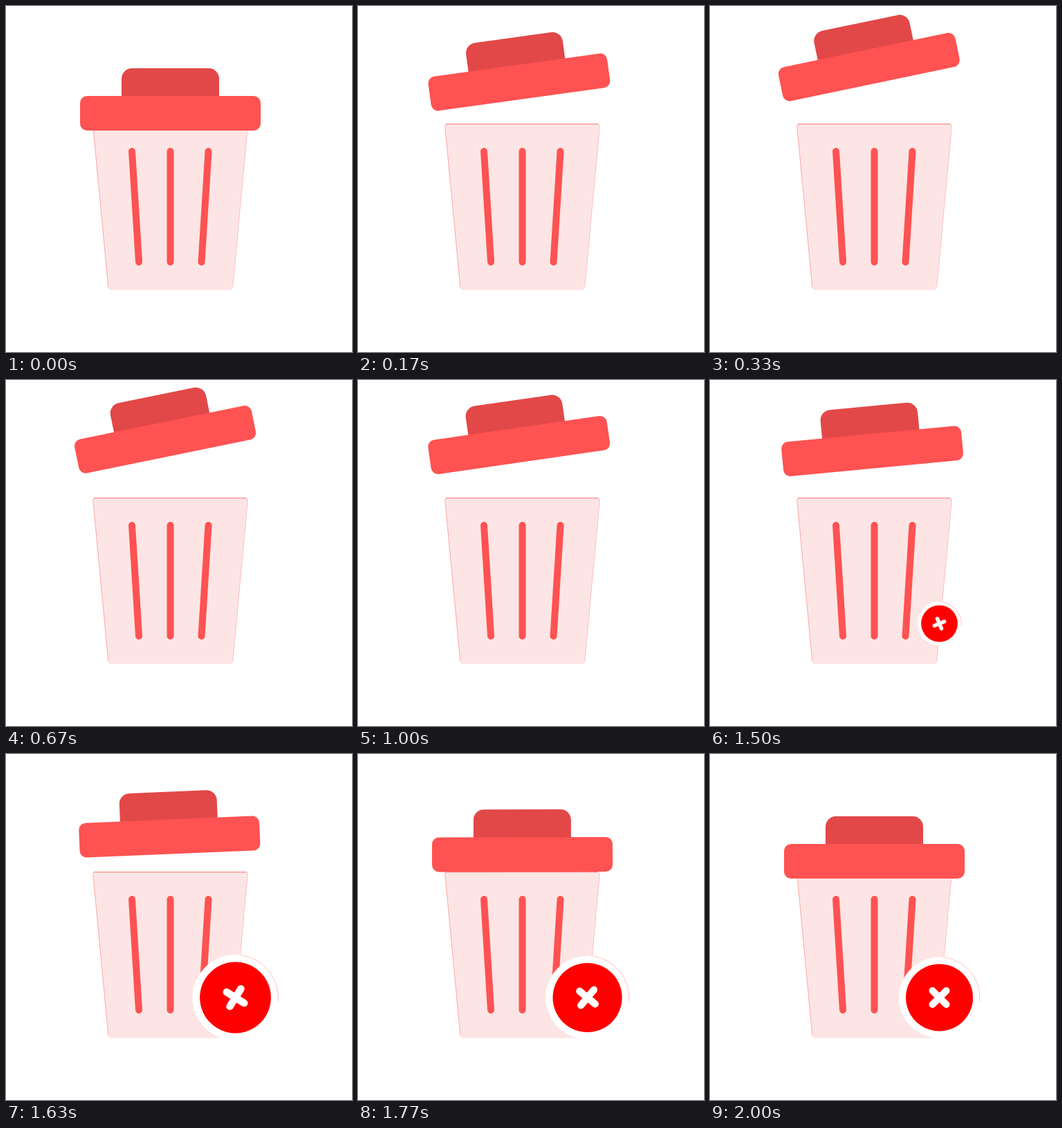
These frames come from a looping animation (500 px wide and 500 px high, 3030 ms). An HTML page:

```html
<!DOCTYPE html>
<html lang="en">
<head>
<meta charset="utf-8">
<title>Delete bin</title>
<style>
  html, body { margin: 0; width: 100%; height: 100%; overflow: hidden; background: #fff; }
  svg { display: block; width: 100%; height: 100%; }
</style>
</head>
<body>
<svg viewBox="0 0 500 500" fill="none" stroke-linecap="round" stroke-linejoin="round">
  <g id="can">
    <path fill="#fde5e5" d="M129 170H346Q350 170 349.6 174L328 406Q327.6 410.5 323 410.5H152Q148 410.5 147.5 406L125.5 174Q125 170 129 170Z"/>
    <path stroke="#ff5252" stroke-opacity=".75" d="M128 170.6H347"/>
    <path stroke="#ff5252" stroke-opacity=".5" stroke-width=".9" d="M128 170.6Q125.4 170.8 125.8 174L147.8 406"/>
    <path stroke="#ff5252" stroke-opacity=".35" stroke-width=".8" d="M347 170.6Q349.6 170.8 349.3 174L327.7 406"/>
    <path stroke="#ff5252" stroke-width="10" d="M182 210L192 370M237.5 210V370M292.5 210L282.5 370"/>
  </g>
  <g id="lid">
    <rect x="167" y="90" width="141" height="60" rx="15" fill="#e24848"/>
    <rect x="107" y="130" width="261" height="50" rx="10" fill="#ff5252"/>
  </g>
  <g id="badge">
    <circle r="58.5" fill="#fff"/>
    <path stroke="#ff5252" stroke-opacity=".45" stroke-width=".8" vector-effect="non-scaling-stroke" d="M8 -57.9A58.5 58.5 0 0 1 58.3 5"/>
    <circle r="48.5" fill="#f00"/>
    <path id="cross" stroke="#fff" stroke-width="10" d="M-10 -10L10 10M10 -10L-10 10"/>
  </g>
</svg>
<script>
  const LOOP = 3030;
  const [lid, badge, cross] = ["lid", "badge", "cross"].map(id => document.getElementById(id));

  const linear = p => p;
  const smooth = p => p * p * (3 - 2 * p);
  const soft = p => (p + smooth(p)) / 2;
  const easeIn = p => p ** 2.45;
  const easeOut = p => 1 - (1 - p) ** 2.4;

  // Each track: a start value, then segments of [from, to, value, easing] in ticks of 1/30 s.
  function track(start, segments, tick) {
    let value = start;
    for (const [from, to, target, ease = linear] of segments) {
      if (tick <= from) break;
      value += (target - value) * ease(Math.min(1, (tick - from) / (to - from)));
    }
    return value;
  }

  const lift = [[0, 15, -48, easeOut], [15, 30, -45.3, smooth], [40, 55, 5.5, easeIn], [55, 60, 0, smooth]];
  const tilt = [[0, 15, -12.7, easeOut], [15, 30, -8.2, smooth], [40, 53.4, 0, soft]];
  const grow = [[40, 50, 1.09, smooth], [50, 55, 1, smooth]];
  const spin = [[40, 50, -15, smooth], [50, 55, 0, smooth]];

  function draw(now) {
    const tick = Math.floor((now % LOOP + 4) * 0.03);
    const scale = track(0, grow, tick);
    lid.setAttribute("transform",
      `translate(0 ${track(0, lift, tick)}) rotate(${track(0, tilt, tick)} 125.5 181)`);
    badge.setAttribute("transform", `translate(331.5 352) scale(${scale})`);
    badge.setAttribute("visibility", scale > 0 ? "visible" : "hidden");
    cross.setAttribute("transform", `rotate(${track(60, spin, tick)})`);
  }

  let start;
  function frame(now) {
    start ??= now;
    draw(now - start);
    requestAnimationFrame(frame);
  }
  draw(0);
  requestAnimationFrame(frame);
</script>
</body>
</html>
```
